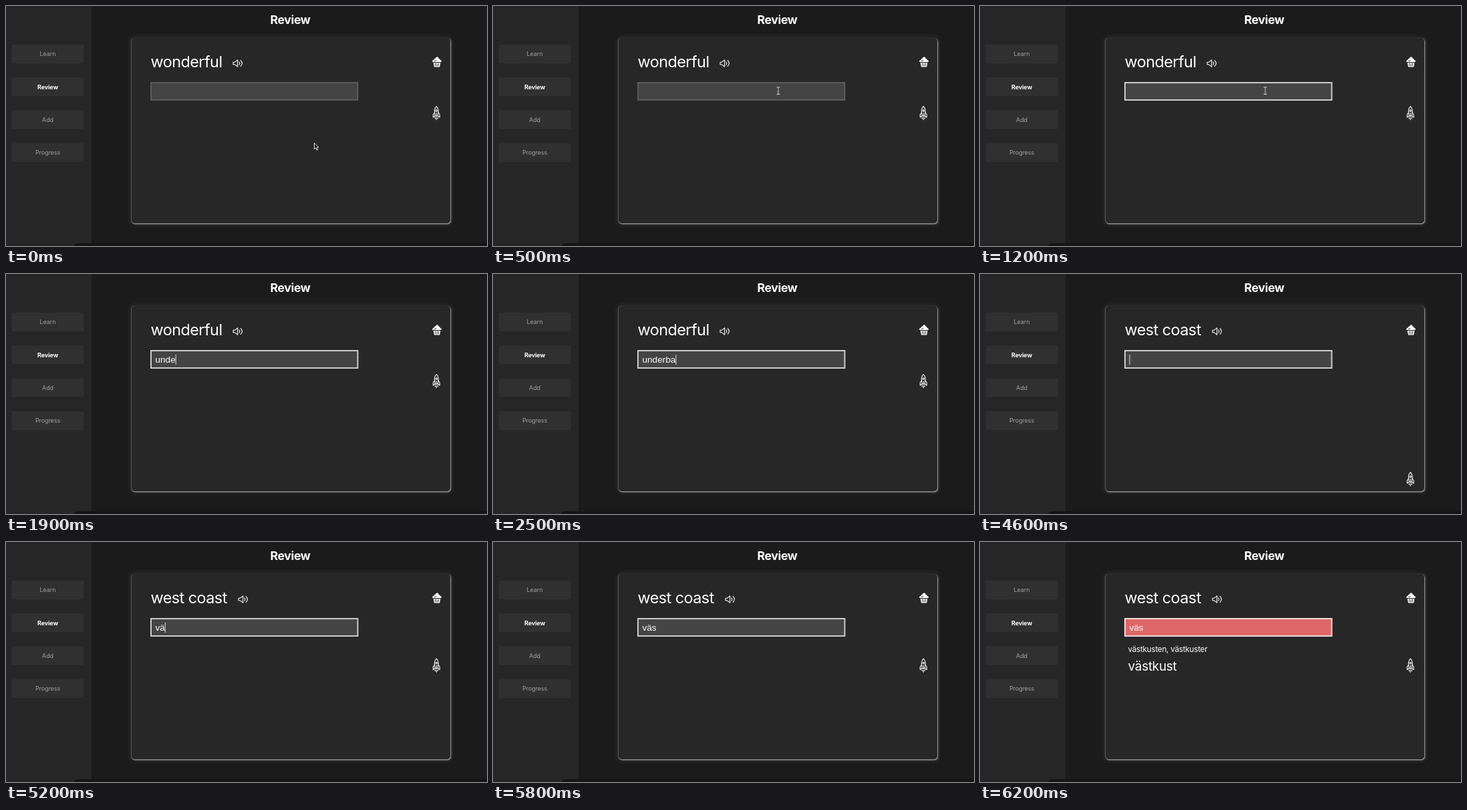
These frames come from a looping animation (720x360 px, 8.3 s). An HTML page:

```html
<!DOCTYPE html>
<html lang="en">
<head>
<meta charset="utf-8">
<title>Vocabulary review</title>
<style>
  html, body { margin: 0; width: 100%; height: 100%; overflow: hidden; background: #1b1b1b; }
  #stage { position: relative; width: 720px; height: 360px; overflow: hidden; }
  #card {
    position: absolute; left: 188px; top: 48px; width: 477px; height: 278px;
    border-radius: 5px; background: #272727;
    box-shadow: 1px 1px 2px #aaa, 0 1px 1px #777, -1px 0 1px #555, 0 0 3px 5px #232323;
  }
  svg { position: absolute; inset: 0; }
  text { font-family: Inter, sans-serif; fill: #fff; white-space: pre; }
  .menu rect { fill: #303030; }
  .menu text { font-size: 9px; letter-spacing: -.1px; text-anchor: middle; fill: #a0a0a0; }
  .menu .active { font-weight: 700; fill: #fff; }
  #title { font-size: 17.8px; font-weight: 700; letter-spacing: -.45px; }
  #word { font-size: 23.5px; letter-spacing: -.6px; }
  #typed { font: 13.6px "Liberation Sans", Arial, sans-serif; }
  #forms { font-size: 11.7px; letter-spacing: -.24px; }
  #answer { font-size: 19px; letter-spacing: -.3px; }
  #field { fill: #444; stroke: #666; stroke-width: 1.5; }
  #field.focus { stroke: #ccc; stroke-width: 2; }
  #field.right { fill: #338c6e; stroke: #d5ede4; stroke-width: 2; }
  #field.wrong { fill: #df6767; stroke: #f6d8d8; stroke-width: 2; }
  .line { fill: none; stroke: #fff; stroke-linecap: round; stroke-linejoin: round; }
</style>
</head>
<body>
<div id="stage">
  <div id="card"></div>
  <svg width="720" height="360" viewBox="0 0 720 360">
    <rect width="128" height="360" fill="#262626"/>
    <path d="M102 360 Q103 356 108 356 H720 V360Z" fill="#141414"/>
    <g class="menu" id="menu"></g>
    <text id="title" x="395.5" y="27">Review</text>
    <text id="word" x="216.5" y="92"></text>

    <g id="speaker" class="line" stroke-width="1.1">
      <path d="M.6 4.2H3.2L7.2.8V11.2L3.2 7.8H.6Z"/>
      <path d="M9.6 3.8Q11.2 6 9.6 8.2M11.8 1.6Q16 6 11.8 10.4"/>
    </g>

    <g transform="translate(638 76)" fill="#fff">
      <path d="M.3 8Q-.2 5 2.5 4.7Q3 2.5 5.2 2.2Q5.8.2 7.6.3Q9.4.5 9.6 2.5Q11.8 3 12 5Q14.3 5.2 13.8 8Z"/>
      <path d="M1.8 9H12.4L11.2 15.6H3Z"/>
      <path d="M4.4 9.4L5 14.4M7.1 9.4V14.4M9.8 9.4L9.2 14.4M3 6.1Q5 7 6.5 5.2" fill="none" stroke="#272727" stroke-width=".9"/>
    </g>

    <g id="rocket" class="line" stroke-width="1.1">
      <path d="M0-10.2Q3.2-6.8 2.9-1.8L2 4.5H-2L-2.9-1.8Q-3.2-6.8 0-10.2Z"/>
      <path d="M-2.8-.8L-4.9 2.3V6.5L-2 4.5M2.8-.8L4.9 2.3V6.5L2 4.5M0 0V5"/>
      <path d="M-1.9 6.8V8.5M0 6.8V10.2M1.9 6.8V8.5"/>
      <circle cy="-3.6" r="1.2"/>
    </g>

    <rect id="field" x="217" y="115" width="309.5" height="26"/>
    <text id="typed" x="223.5" y="133"></text>
    <rect id="caret" y="121" width="1" height="15" fill="#ddd"/>
    <text id="forms" x="221.5" y="165"></text>
    <text id="answer" x="221.5" y="193"></text>

    <path id="arrow" d="M0 0V9L2.1 7.2L3.6 10.6L5.2 9.9L3.7 6.6H6.3Z" fill="#111" stroke="#fff" stroke-width=".9"/>
    <g id="beam" fill="none">
      <path d="M-2.2-5.2Q0-5.2 0-3.5V3.5Q0 5.2-2.2 5.2M2.2-5.2Q0-5.2 0-3.5V3.5Q0 5.2 2.2 5.2M-1.2.8H1.2" stroke="#eee" stroke-width="1.7"/>
      <path d="M-2-5.2Q0-5.2 0-3.5V3.5Q0 5.2-2 5.2M2-5.2Q0-5.2 0-3.5V3.5Q0 5.2 2 5.2" stroke="#222" stroke-width=".6"/>
    </g>
  </svg>
</div>
<script>
const LOOP = 8300;
const el = id => document.getElementById(id);

el('menu').innerHTML = ['Learn', 'Review', 'Add', 'Progress'].map((label, i) => {
  const y = 58 + i * 49.3;
  return `<rect x="8.5" y="${y}" width="108" height="28" rx="2"/>
    <text class="${label === 'Review' ? 'active' : ''}" x="62.5" y="${y + 17.2}">${label}</text>`;
}).join('');

// Each step overrides part of the state from its start time on.
const steps = [
  [0, { word: 'wonderful', speaker: 339.5, rocket: 160.5, state: '', typed: '',
        caret: false, forms: '', answer: '', pointer: 'arrow', at: [461.5, 205.5] }],
  [300, { at: [452, 184] }],
  [400, { pointer: 'beam', at: [430, 135] }],
  [500, { at: [427, 127] }],
  [700, { state: 'focus', caret: true }],
  [1200, { caret: false }],
  [1500, { typed: 'u', caret: true, pointer: '' }],
  [1600, { typed: 'un' }],
  [1700, { typed: 'und' }],
  [1900, { typed: 'unde' }],
  [2000, { typed: 'under' }],
  [2400, { typed: 'underb' }],
  [2500, { typed: 'underba' }],
  [2600, { typed: 'underbar', state: 'right', caret: false, forms: 'underbart, underbara' }],
  [4600, { word: 'west coast', speaker: 347.5, rocket: 307.5, state: 'focus', typed: '', caret: true, forms: '' }],
  [4700, { rocket: 185 }],
  [5000, { typed: 'v' }],
  [5200, { typed: 'vä' }],
  [5300, { typed: 'väs' }],
  [5800, { caret: false }],
  [6200, { state: 'wrong', forms: 'västkusten, västkuster', answer: 'västkust' }],
];

const show = (id, on) => el(id).setAttribute('visibility', on ? 'visible' : 'hidden');
const move = (id, x, y) => el(id).setAttribute('transform', `translate(${x} ${y})`);

function draw() {
  const time = performance.now() % LOOP;
  const s = Object.assign({}, ...steps.filter(([start]) => start <= time).map(([, change]) => change));
  for (const id of ['word', 'typed', 'forms', 'answer']) el(id).textContent = s[id];
  el('field').setAttribute('class', s.state);
  move('speaker', s.speaker, 80);
  move('rocket', 644.3, s.rocket);
  show('caret', s.caret);
  el('caret').setAttribute('x', 223.5 + el('typed').getComputedTextLength());
  for (const id of ['arrow', 'beam']) {
    show(id, s.pointer === id);
    move(id, ...s.at);
  }
  requestAnimationFrame(draw);
}
draw();
</script>
</body>
</html>
```
